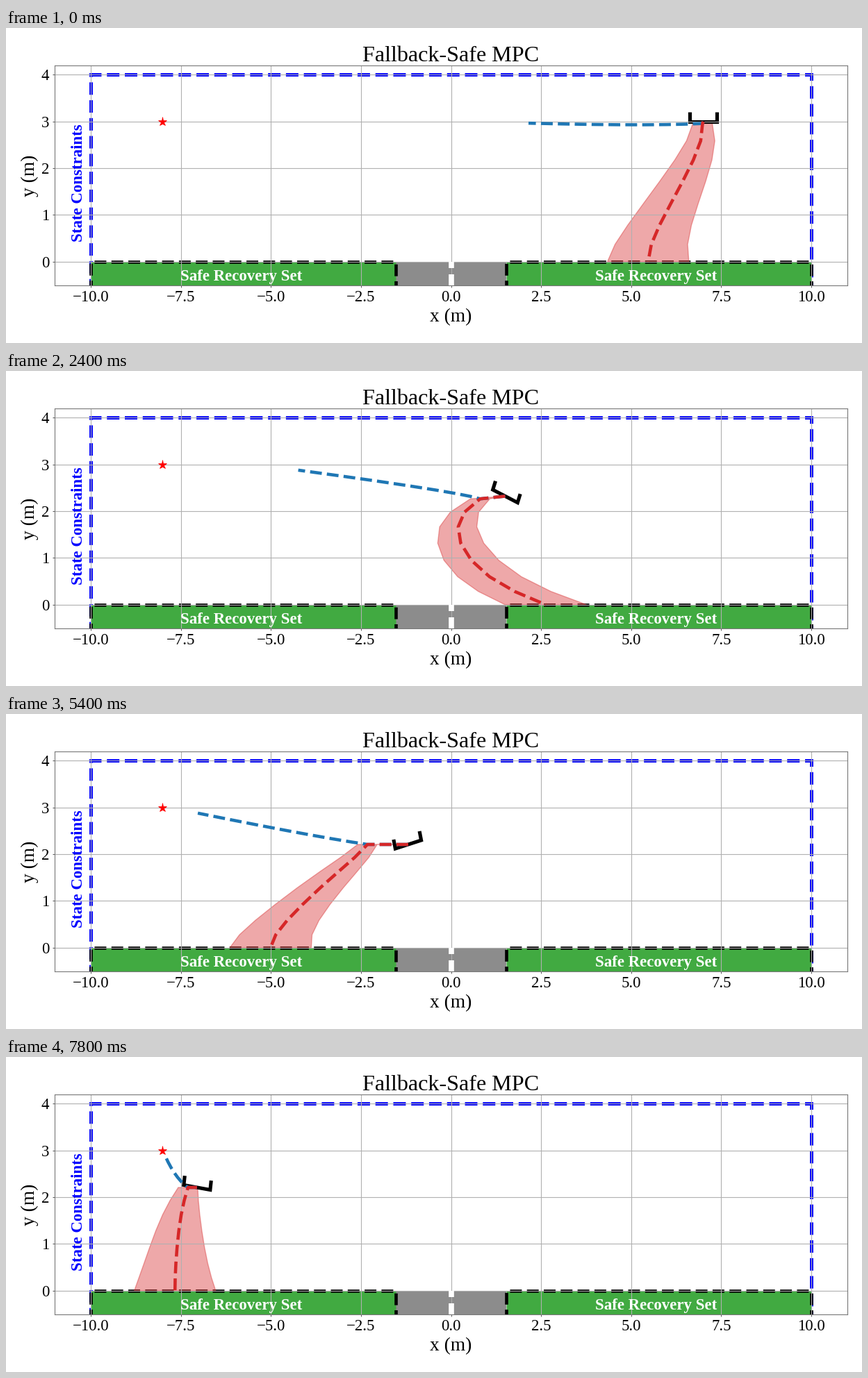
A matplotlib script for the animation above (8 s loop, 1232 by 454 pixels).

```python
import numpy as np
import matplotlib.pyplot as plt
from matplotlib.animation import FuncAnimation
from matplotlib.patches import Polygon, Rectangle

W, H, DPI = 1232, 454, 100
FRAMES, INTERVAL = 40, 200
LEAD = 2               # frames between the drone and the shared waypoint
CRUISE = 2.21          # height the drone settles at
HOLD = (16, 20, 23)    # last right-hand plan, switch, first left-hand plan

# Drone track and tilt as (frame, value)
TRACK = np.array([
    (0, 7.0), (2, 6.98), (4, 6.77), (6, 5.58), (8, 3.79), (10, 2.36),
    (16, 0.26), (18, -0.10), (23, -0.53), (25, -0.61), (31, -3.56),
    (33, -4.93), (39, -7.05), (41, -7.30),
])
TILT = np.array([(0, 0), (4, 65), (8, -33), (16, -8), (23, -2), (27, 14),
                 (31, -18), (39, -8)])

# frame, fallback foot x, its start and end slope, nominal bend x, y, end x
PLANS = np.array([
    (0, 5.47, 0.3, 0.0, 5.50, 2.90, 2.15),
    (4, 2.63, -7.0, 3.0, 3.80, 2.55, -4.29),
    (8, 2.63, -5.5, 5.0, 1.30, 2.36, -4.29),
    (16, 2.63, -2.5, 7.5, -0.60, 2.50, -4.19),
    (23, -2.61, 0.0, -1.2, -1.60, 2.55, -5.70),
    (31, -6.62, -4.0, 0.6, -6.10, 2.20, -7.89),
    (39, -7.66, -0.8, 0.0, -7.65, 2.40, -7.93),
])

STEP = np.linspace(0, 1, 8)
FALL = 1 - STEP + 0.022 * np.sin(2 * np.pi * STEP)
TUBE = 0.27 + 0.86 * STEP


def cubic(s, v0, v1, m0, m1):
    """Curve from v0 to v1 with slopes m0 and m1 at the ends."""
    return (v0 + (v1 - v0) * s * s * (3 - 2 * s)
            + m0 * s * (1 - s) ** 2 - m1 * s * s * (1 - s))


def follow(keys, at):
    """Smooth path through the key rows without overshoot."""
    t, v = keys[:, 0], keys[:, 1:]
    d = np.diff(v, axis=0) / np.diff(t)[:, None]
    a, b = d[:-1], d[1:]
    same = a * b > 0
    m = np.where(same, 2 * a * b / np.where(same, a + b, 1), 0)
    m = np.vstack([d[:1], m, d[-1:]])
    i = np.clip(np.searchsorted(t, at, side="right") - 1, 0, len(t) - 2)
    h = t[i + 1] - t[i]
    return cubic((at - t[i]) / h, v[i], v[i + 1], h * m[i], h * m[i + 1])


def drone_at(frame):
    x = follow(TRACK, frame)[0]
    return x, CRUISE + 0.79 * np.exp(-(frame / 8.6) ** 2)


def drone_shape(x, y, degrees):
    c, s = np.cos(np.radians(degrees)), np.sin(np.radians(degrees))
    cup = np.array([[-0.37, 0.2], [-0.37, 0], [0.37, 0], [0.37, 0.2]])
    return cup @ [[c, s], [-s, c]] + [x, y]


def plan_time(frame):
    """Hold the fallback plan on either side of the change of target set."""
    before, switch, after = HOLD
    if before <= frame < after:
        return before if frame < switch else after
    return frame


fig = plt.figure(figsize=(W / DPI, H / DPI), dpi=DPI, facecolor="white")
plt.rcParams["font.family"] = "Liberation Serif"
ax = fig.add_axes([70 / W, 83.5 / H, 1141 / W, 316.5 / H])
ax.set(xlim=(-11, 11), ylim=(-0.5, 4.2),
       xticks=np.arange(-10, 10.1, 2.5), yticks=range(5))
ax.tick_params(labelsize=16.5, length=2.5, width=0.7, pad=3, color="#555555")
ax.grid(True, color="#b0b0b0", lw=0.8)
for spine in ax.spines.values():
    spine.set(linewidth=0.8, color="#777777")


def label(x, y, text, size, **kw):
    fig.text(x / W, 1 - y / H, text, size=size, ha="center", va="baseline",
             rotation_mode="anchor", **kw)


label(640.5, 47.5, "Fallback-Safe MPC", 23.1)
label(640.5, 423, "x (m)", 19.7)
label(41, 213, "y (m)", 19.7, rotation=90)

# State constraints, road and recovery sets
ax.add_patch(Rectangle((-10, -1), 20, 5, fill=False, ec="blue", lw=3.5, ls="--"))
ax.add_patch(Rectangle((-1.53, -1), 3.06, 1, fc="#8c8c8c", ec="none"))
for left in (-10, 1.53):
    ax.add_patch(Rectangle((left, -1), 8.47, 1, fc="#41aa41", ec="black",
                           lw=3.3, ls="--"))
for low, high in ((-0.13, 0), (-0.5, -0.27)):
    ax.plot([0, 0], [low, high], color="white", lw=5.5, solid_capstyle="butt")

bold = dict(size=16.5, weight="bold", va="baseline", rotation_mode="anchor")
for left in (-7.51, 4.0):
    ax.text(left, -0.4, "Safe Recovery Set", color="white", **bold)
ax.text(-10.23, 0.43, "State Constraints", color="blue", rotation=90, **bold)
ax.plot(-8.01, 3, marker="*", ms=9.5, mew=0.5, color="red", zorder=4)

# Moving parts
tube = Polygon(np.zeros((3, 2)), color="tab:red", alpha=0.4, lw=1, zorder=1.2)
ax.add_patch(tube)
body, = ax.plot([], [], color="black", lw=3.7, zorder=1.3,
                solid_capstyle="butt", solid_joinstyle="miter")
nominal, = ax.plot([], [], "--", color="tab:blue", lw=3.3, zorder=2.5)
fallback, = ax.plot([], [], "--", color="tab:red", lw=3.3, zorder=2.6)


def draw(frame):
    x, y = drone_at(frame)
    near_x, near_y = drone_at(frame + LEAD)
    body.set_data(*drone_shape(x, y, follow(TILT, frame)[0]).T)

    foot, start, end = follow(PLANS, plan_time(frame))[:3]
    mid = cubic(STEP, near_x, foot, start, end)
    level = near_y * FALL
    fallback.set_data(np.r_[x, mid], np.r_[y, level])
    tube.set_xy(np.column_stack([
        np.r_[x, mid - TUBE, (mid + TUBE)[::-1]],
        np.r_[y, level, level[::-1]]]))

    bend_x, bend_y, end_x = follow(PLANS, frame)[3:]
    end_y = 2.88 + 0.085 * np.exp(-frame)
    pull = np.array([(1 - STEP) ** 2, 2 * STEP * (1 - STEP), STEP ** 2])
    nominal.set_data(np.r_[x, [near_x, bend_x, end_x] @ pull],
                     np.r_[y, [near_y, bend_y, end_y] @ pull])
    return tube, body, nominal, fallback


anim = FuncAnimation(fig, draw, frames=FRAMES, interval=INTERVAL,
                     repeat=True, repeat_delay=0, blit=False)
plt.show()
```
